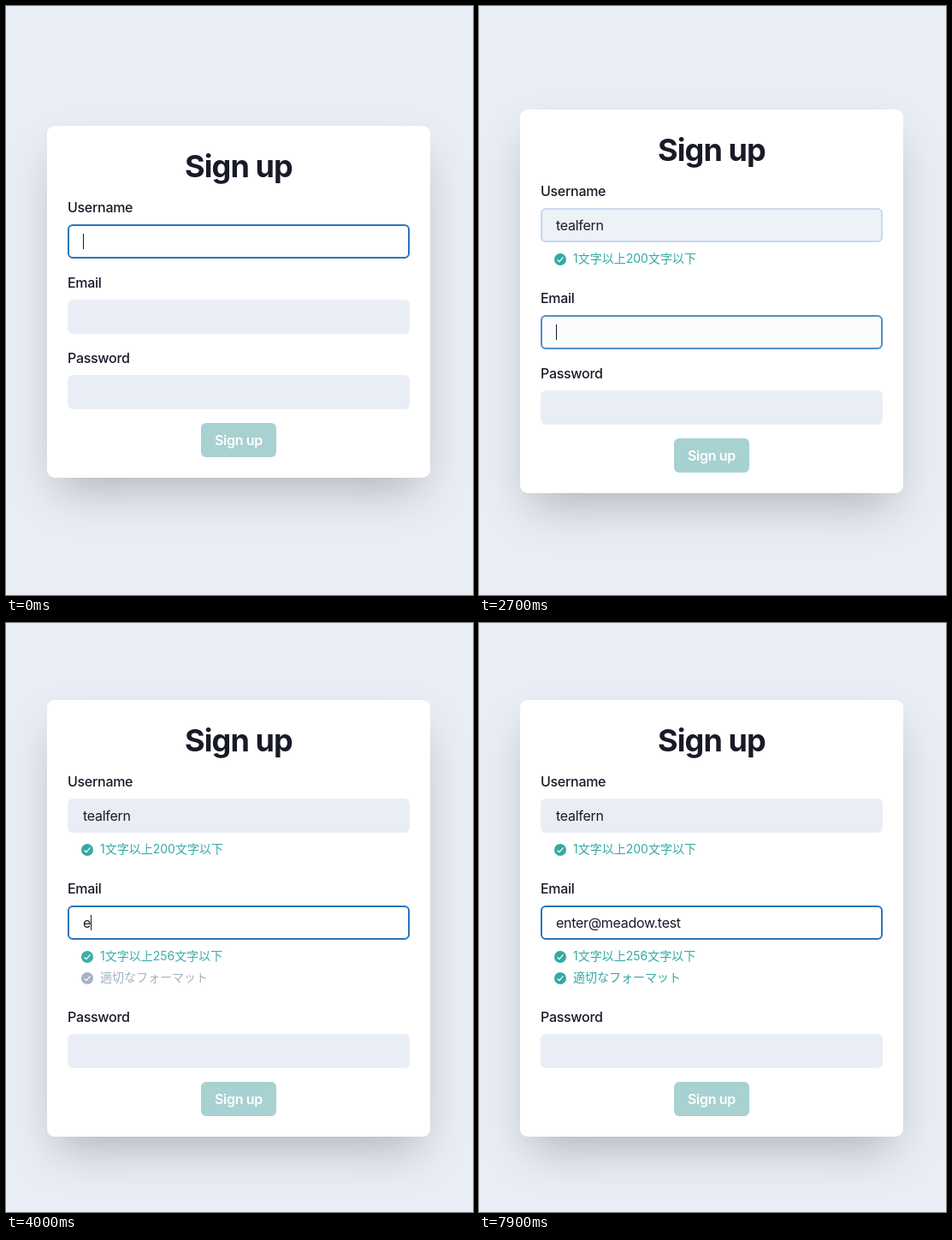
These frames come from a looping animation (546x688 px, 8 s). An HTML page:

```html
<!DOCTYPE html>
<html lang="ja">
<head>
<meta charset="utf-8">
<title>Sign up</title>
<style>
  * { box-sizing: border-box; margin: 0; }
  html, body { width: 100%; height: 100%; overflow: hidden; }
  body {
    position: relative;
    background: #e9eef6;
    color: #191a28;
    font: 16px/24px Inter, "Noto Sans CJK JP", "Noto Sans CJK", sans-serif;
    letter-spacing: -.3px;
  }
  .card {
    position: absolute;
    left: 48px;
    width: 448px;
    padding: 24px;
    border-radius: 9px;
    background: #fff;
    box-shadow: 0 25px 50px -12px rgba(0, 0, 0, .25);
  }
  h1 {
    margin-bottom: 13px;
    font-size: 36px;
    font-weight: 700;
    line-height: 46px;
    letter-spacing: -.9px;
    text-align: center;
  }
  .field { margin-bottom: 16px; }
  .label { margin-bottom: 8px; font-weight: 500; }
  .input {
    display: flex;
    align-items: center;
    height: 40px;
    padding: 0 16px;
    border: 2px solid transparent;
    border-radius: 6px;
    background: #e9eef6;
    white-space: pre;
  }
  .caret { width: 1px; height: 18px; margin-right: -1px; background: #191a28; }
  .rules { height: 0; overflow: hidden; color: #33aaa4; }
  .rule {
    display: flex;
    align-items: center;
    height: 21px;
    margin: 0 0 4px 16px;
    font-size: 14px;
    line-height: 21px;
    letter-spacing: 0;
    white-space: nowrap;
  }
  .rule:first-child { margin-top: 8px; }
  .rule svg { position: relative; top: 1.5px; width: 14px; height: 14px; margin-right: 8px; }
  .button {
    width: 88px;
    height: 40px;
    margin: 0 auto;
    border-radius: 6px;
    background: #a8d1d1;
    color: #fff;
    font-weight: 600;
    line-height: 40px;
    text-align: center;
  }
</style>
</head>
<body>
<div class="card">
  <h1>Sign up</h1>
  <div id="form"></div>
  <div class="button">Sign up</div>
</div>
<script>
const LOOP = 8000;
const CARD_HEIGHT = 411, CARD_CENTER = 345.3;
const FOCUS_SWITCH = 2600;
const FORMAT_VALID = 7200;
const CARET_OFF = [[200, 700], [3100, 3600], [7750, 8000]];

const FIELDS = [
  {
    label: 'Username', text: 'tealfern', rules: ['1文字以上200文字以下'], openHeight: 37,
    keys: [700, 1200, 1400, 1700, 1800, 1900, 2000, 2200], openAt: 700
  },
  {
    label: 'Email', text: 'enter@meadow.test', rules: ['1文字以上256文字以下', '適切なフォーマット'], openHeight: 62,
    keys: [3700, 4200, 4400, 4500, 4600, 5100, 5600, 5800, 6000, 6200, 6400, 6500,
           6900, 7000, 7100, 7200, 7300], openAt: 3715
  },
  { label: 'Password', text: '', rules: [], openHeight: 0, keys: [], openAt: LOOP }
];

const checkIcon = `<svg viewBox="0 0 14 14"><circle cx="7" cy="7" r="7" fill="currentColor"/>
  <path d="M3.6 7.5 5.9 9.7 10.5 4.4" fill="none" stroke="#fff" stroke-width="1.2"/></svg>`;

const card = document.querySelector('.card');
const form = document.getElementById('form');
form.innerHTML = FIELDS.map(({ label, rules }) => `
  <div class="field">
    <div class="label">${label}</div>
    <div class="input"><span class="text"></span><span class="caret"></span></div>
    <div class="rules">${rules.map(r => `<div class="rule">${checkIcon}${r}</div>`).join('')}</div>
  </div>`).join('');

const views = [...form.children].map(field => ({
  input: field.querySelector('.input'),
  text: field.querySelector('.text'),
  caret: field.querySelector('.caret'),
  rules: field.querySelector('.rules')
}));
const formatRule = views[1].rules.lastElementChild;

// cubic-bezier(.25, .1, .25, 1), solved by bisection
function ease(x) {
  if (x <= 0) return 0;
  if (x >= 1) return 1;
  const bezier = (u, a, b) => 3 * u * (1 - u) ** 2 * a + 3 * u * u * (1 - u) * b + u ** 3;
  let low = 0, high = 1;
  for (let i = 0; i < 24; i++) {
    const mid = (low + high) / 2;
    if (bezier(mid, .25, .25) < x) low = mid; else high = mid;
  }
  return bezier(low, .1, 1);
}

const mix = (from, to, amount) => `color-mix(in srgb, ${to} ${amount * 100}%, ${from})`;

function render(t) {
  const switched = ease((t - FOCUS_SWITCH) / 200);
  const focus = [1 - switched, switched, 0];
  const focused = t < FOCUS_SWITCH ? 0 : 1;
  const caretOn = !CARET_OFF.some(([from, to]) => t >= from && t < to);
  let height = CARD_HEIGHT;

  FIELDS.forEach((field, i) => {
    const view = views[i];
    const open = field.openHeight * ease((t - field.openAt) / 300);
    height += open;
    view.text.textContent = field.text.slice(0, field.keys.filter(k => k <= t).length);
    view.caret.style.visibility = caretOn && i === focused ? 'visible' : 'hidden';
    view.input.style.background = mix('#e9eef6', '#fff', focus[i]);
    view.input.style.borderColor = `rgba(43, 116, 187, ${focus[i]})`;
    view.rules.style.height = open + 'px';
    view.rules.style.opacity = ease((t - field.openAt) / 400);
  });

  formatRule.style.color = mix('#a0aec0', '#33aaa4', ease((t - FORMAT_VALID) / 200));
  card.style.height = height + 'px';
  card.style.top = CARD_CENTER - height / 2 + 'px';
}

const start = performance.now();
function tick() {
  render((performance.now() - start) % LOOP);
  requestAnimationFrame(tick);
}
tick();
</script>
</body>
</html>
```
